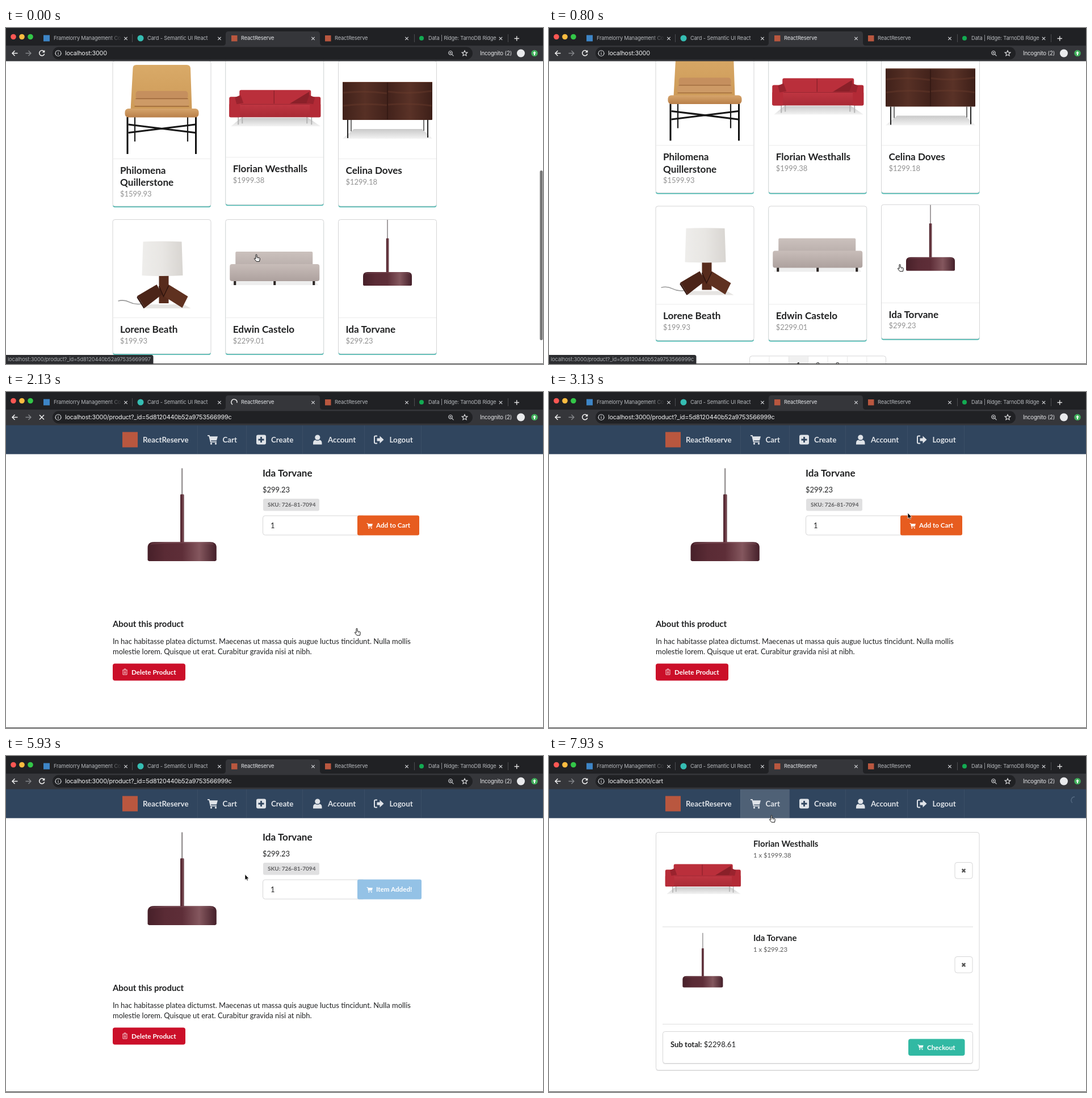
Recreate the animation shown at these times as an HTML page. Size 946 px wide and 592 px high, loop 8000 ms.

```html
<!DOCTYPE html>
<html lang="en">
<head>
<meta charset="utf-8">
<title>Shop demo</title>
<style>
html, body { margin: 0; width: 100%; height: 100%; overflow: hidden; background: #fff; }
svg { display: block; width: 946px; height: 592px; font-family: Lato, sans-serif; }
text { white-space: pre; }
.ui { font-family: Inter, sans-serif; }
</style>
</head>
<body>
<svg id="stage" viewBox="0 0 946 592"></svg>
<script>
const INK = '#212223', NAV = '#30455e', PALE = '#dfe3e8', BAR = '#35363a', DARK = '#202124', BRAND = '#b9573f';

// y is the middle of the capitals
const text = (x, y, s, size = 12.95, weight = 400, fill = INK, more = '') =>
  `<text x="${x}" y="${y + size * .35}" font-size="${size}" font-weight="${weight}" fill="${fill}" ${more}>${s}</text>`;
const ui = (x, y, s, size, fill, more = '') =>
  text(x, y, s, size, 400, fill, `class="ui" letter-spacing="${-size * .018}" ${more}`);
const rect = (x, y, w, h, fill, r = 0, more = '') =>
  `<rect x="${x}" y="${y}" width="${w}" height="${h}" rx="${r}" fill="${fill}" ${more}/>`;
const dot = (x, y, r, fill) => `<circle cx="${x}" cy="${y}" r="${r}" fill="${fill}"/>`;
const line = (d, stroke, w = 1, more = '') => `<path d="${d}" fill="none" stroke="${stroke}" stroke-width="${w}" ${more}/>`;
const fill = (d, color, more = '') => `<path d="${d}" fill="${color}" ${more}/>`;
const group = (id, body, more = '') => `<g id="${id}" ${more}>${body}</g>`;
const put = (id, x, y, scale = 1, more = '') => `<use href="#${id}" transform="translate(${x} ${y}) scale(${scale})" ${more}/>`;
const grad = (id, vertical, ...colors) =>
  `<linearGradient id="${id}" x2="${vertical ? 0 : 1}" y2="${vertical ? 1 : 0}">` +
  colors.map((c, i) => `<stop offset="${i / (colors.length - 1)}" stop-color="${c}"/>`).join('') + '</linearGradient>';
const cross = (x, y, r, color, w) => line(`M${x - r} ${y - r}l${2 * r} ${2 * r}m0 ${-2 * r}l${-2 * r} ${2 * r}`, color, w);
const boxed = (x, y, w, h, r = 4) => rect(x, y, w, h, '#fff', r, 'stroke="#d6d6d7"');

// Product pictures, each in a 174 unit square
const pictures =
  group('chair',
    line('M39.500 100V143M132.500 100V143', '#1b1b1b', 2.2) +
    line('M26.500 100V165M147 100V165', '#111', 3) + line('M28 127.500L146 113M28 113L146 127.500', '#161616', 3) +
    fill('M36 14Q36 8 42 8H131Q137 8 137.500 14L140 87H32Z', 'url(#tan)') +
    rect(41, 54, 92, 14, '#c58f5e', 5) + rect(38, 67, 97, 13, '#cd9a66', 5) +
    line('M41 67.500H133M39 81H135', '#9a6639', 1.3) + rect(22, 85, 130, 15.5, 'url(#seat)', 6)) +
  group('sofa',
    fill('M10 119L28 104H146L168 119Z', 'url(#shadow)') + line('M23 102V116M30 102V114M144 102V114M152 102V116', '#b4b4b4', 2) +
    rect(25, 55, 126, 40, '#ba2f3b', 3) + fill('M112 80L148 58V80Z', '#8a2029') + line('M86 56V80', '#84202a', 1.2) +
    rect(7, 79, 161, 24, 'url(#red)', 2) + rect(7, 67, 19, 36, '#b72d39', 3) + rect(149, 67, 19, 36, '#b32a36', 3) +
    fill('M17 68L27 64L32 78L20 80Z', '#9a232e') + fill('M143 78L148 64L158 68L155 80Z', '#9a232e') + line('M27 80H149', '#96242f')) +
  group('sideboard',
    fill('M8 138L28 121H148L166 138Z', 'url(#shadow)') + line('M17 105V137M158 105V136', '#222', 2) +
    line('M23 105V125M151 105V124', '#444', 1.5) + rect(8, 38, 158, 67, 'url(#wood)', 1) +
    line('M87 39V104', '#2a130f') + line('M9 57Q50 53 86 58M9 80Q45 75 86 79M88 55Q125 60 165 54M88 78Q130 75 165 80', '#71402f', 3, 'opacity=".35"') +
    line('M8 38.500H166', '#6f4233')) +
  group('tablelamp',
    line('M10 144Q20 141 30 146T50 149', '#999', 1.5) + fill('M52 157H138L126 150H60Z', '#e6e4e2') +
    rect(82, 98, 17, 50, '#572b1c') + fill('M44 135L78 115L88 132L57 156Z', '#4b2418') +
    fill('M99 115L133 136L123 156L88 134Z', '#5f3120') + fill('M44 135L57 156L55 157L43 138Z', '#331710') + line('M82 118L90 136L99 117', '#2d130d', 1.5) +
    fill('M54 39.500Q88 38 122 39.500L124 99Q88 101 52 99Z', 'url(#shade)')) +
  group('couch',
    fill('M10 116H164L158 108H16Z', '#eee') + [15, 85, 154].map(x => rect(x, 108, 4, 8, '#2b2523')).join('') +
    rect(18, 57, 136, 34, 'url(#greyback)', 2) + rect(8, 79, 158, 30, 'url(#greyseat)', 4)) +
  group('pendant',
    line('M87 1V34', '#9a9697', 1.8) + rect(84.800, 33.500, 4.600, 61, 'url(#plum)', 1) +
    fill('M44 100Q44 93 52 93H122Q130 93 130 100V115Q130 117 127 117H47Q44 117 44 115Z', 'url(#plum)') +
    line('M48 95.500Q87 92.500 126 95.500', '#87585f', 1, 'opacity=".6"'));

const icons =
  group('basket', fill('M0 0H3.600L4.200 2.200H18L16 9.500H6L6.300 11H16V12.700H4.900L2.300 1.700H0Z', 'currentColor') +
    '<g fill="currentColor"><circle cx="6.500" cy="15" r="1.700"/><circle cx="14.500" cy="15" r="1.700"/></g>') +
  group('hand', fill('M3 1.200Q3 0 4 0T5 1.200V5L9.500 6Q10.600 6.300 10.300 8L9.500 12.300H4.200L.6 8Q0 6.500 1.500 6.700L3 7.800Z',
    '#fff', 'stroke="#111" stroke-linejoin="round" transform="translate(-4 0)"') + line('M2.300 6.500v2M4 6.800v2', '#555', .6)) +
  group('arrow', fill('M0 0V10L2.300 8L3.800 11.200L5.400 10.500L4 7.400H7Z', '#000', 'stroke="#fff" stroke-width=".7"'));

const defs = '<defs>' +
  grad('tan', 1, '#d9aa68', '#cd9a58') + grad('seat', 1, '#d6a56c', '#b97f49') + grad('red', 1, '#c03642', '#a82a35') +
  grad('shadow', 1, '#c9c9c9', '#f3f3f3') +
  grad('wood', 0, '#40211a', '#573025', '#42221b', '#5a3227', '#3d1f18') + grad('shade', 0, '#eeedeb', '#e8e6e3', '#d8d5d1') +
  grad('greyback', 1, '#cbc1bd', '#b4a9a6') + grad('greyseat', 1, '#c8bdb9', '#ada19e') +
  grad('plum', 0, '#472029', '#5a2b35', '#5e2e38', '#84575e', '#45202a') +
  `<linearGradient id="fade"><stop stop-color="${DARK}" stop-opacity="0"/><stop offset="1" stop-color="${DARK}"/></linearGradient>` +
  pictures + icons + '</defs>';

const LAMP = 'Ida Torvane', SOFA = 'Florian Westhalls';
const cards = [
  ['chair', 'Philomena|Quillerstone', '$1599.93'], ['sofa', SOFA, '$1999.38'], ['sideboard', 'Celina Doves', '$1299.18'],
  ['tablelamp', 'Lorene Beath', '$199.93'], ['couch', 'Edwin Castelo', '$2299.01'], ['pendant', LAMP, '$299.23']
];
const card = ([art, name, price], i) => {
  const x = 187.5 + i % 3 * 198.75, y = i < 3 ? 57 : 337, h = i < 3 ? 258 : 238, lines = name.split('|');
  return group('card' + i, rect(x + .5, y + 4, 173, h - 3, '#45b8b0', 4) + rect(x + .5, y + .5, 173, h - 1.5, '#fff', 4, 'stroke="#d4d4d5"') +
    put(art, x, y) + rect(x + 1, y + 173, 172, 1, '#ececec') +
    lines.map((s, n) => text(x + 13.5, y + 194 + n * 21.5, s, 17.14, 700)).join('') +
    text(x + 13.5, y + 214 + (lines.length - 1) * 21.5, price, 12.95, 400, '#929292'));
};
const pager = boxed(353.5, 601.5, 240, 33) + rect(422, 602, 34.3, 32, '#f0f0f0') +
  [1, 2, 3, 4, 5, 6].map(i => rect(353 + i * 34.4, 602, 1, 32, '#e6e6e6')).join('') +
  [...'«‹123›»'].map((s, i) => text(370.5 + i * 34.4, 616.5, s, 11.67, i === 2 ? 700 : 400, INK, 'text-anchor="middle"')).join('');
const home = group('home', cards.map(card).join('') + pager);

const nav = group('nav', rect(0, 58, 946, 51.5, NAV) + rect(337, 58.5, 86.5, 51, '#fff', 0, 'id="cartTab"') +
  [337, 423, 522, 631, 731].map(x => rect(x, 59, 1, 50, '#fff', 0, 'opacity=".05"')).join('') +
  rect(205, 70.5, 27, 27, BRAND) +
  [[241, 'ReactReserve'], [381.5, 'Cart'], [467, 'Create'], [567, 'Account'], [675.5, 'Logout']]
    .map(([x, s]) => text(x, 84.5, s, 13.33, 700, PALE)).join('') +
  put('basket', 355, 76, 1, `color="${PALE}"`) +
  rect(441, 75.5, 17, 17, PALE, 3) + line('M449.500 79v10M444.500 84h10', NAV, 2.8) +
  dot(548.8, 80, 4.6, PALE) + fill('M541 92.500V90Q541 85 545 84.500Q549 87 552.500 84.500Q556.500 85 556.500 90V92.500Z', PALE) +
  line('M654 77.500H651Q649 77.500 649 79.500V88.500Q649 90.500 651 90.500H654', PALE, 2) + fill('M653.500 81.500H658.500V77.500L665.500 84L658.500 90.500V86.500H653.500Z', PALE) +
  line('M926 72A6 6 0 0 0 922 82.500', '#8fa3ba', 1.3, 'id="progress"'));

const product = group('product', put('pendant', 187.5, 133, 1.41) + text(452, 143.5, LAMP, 17.14, 700) + text(452, 172, '$299.23') +
  rect(453, 188, 99, 21.5, '#e0e0e1', 3) + text(461, 198.5, 'SKU: 726-81-7094', 10, 700, '#606062') +
  boxed(452.5, 218, 180, 34) + text(466, 235, '1') +
  rect(619, 217.5, 109, 35, '#e75c1f', 3, 'id="buy"') +
  group('buyLabel', put('basket', 635.5, 231, .58, 'color="#fff"') + text(652, 235, '', 11.67, 700, '#fff')) +
  line('M673 229A6 6 0 0 1 679 235', '#fff', 2, 'id="busy"') +
  text(188, 408.5, 'About this product', 14.95, 700) +
  text(188, 439, 'In hac habitasse platea dictumst. Maecenas ut massa quis augue luctus tincidunt. Nulla mollis') +
  text(188, 457.5, 'molestie lorem. Quisque ut erat. Curabitur gravida nisi at nibh.') +
  rect(188, 478.5, 128, 30, '#cb0f29', 4) + line('M205 490h9M208 489.500v-1.500h3v1.500M206 490.500v7.500h7v-7.500M208.500 492v4.500M210.500 492v4.500', '#fff', .8) +
  text(221, 493.5, 'Delete Product', 11.67, 700, '#fff'));

const row = (art, y, name, detail) => put(art, 199, y, .826) + text(360, y + 9.5, name, 14.95, 700) +
  text(360, y + 30.5, detail, 11.3, 400, '#5a5a5a') + boxed(715, y + 42.5, 31, 28.5) + cross(730.5, y + 57, 2.8, '#555', 2.4);
const cart = group('cart', rect(188.5, 135.5, 569.5, 419.5, '#e6e6e6', 4) + boxed(188.5, 134.5, 569.5, 419) +
  row('sofa', 145, SOFA, '1 x $1999.38') + row('pendant', 311, LAMP, '1 x $299.23') +
  rect(200, 300.5, 547, 1, '#dedede') + rect(200, 472, 547, 1, '#dedede') +
  rect(200.5, 487, 546, 56, '#e6e6e6', 4) + boxed(200.5, 485.5, 546, 56) + text(214, 508.5, '<tspan font-weight="700">Sub total:</tspan> $2298.61', 13.1) +
  rect(633, 498.5, 99.5, 29.5, '#31b9a3', 4) + put('basket', 649.5, 508.5, .56, 'color="#fff"') + text(666, 513.5, 'Checkout', 11.67, 700, '#fff'));

const tabs = [
  ['Framelorry Management Co', rect(66, 12.5, 11, 11, '#3d85c6')], ['Card - Semantic UI React', dot(237, 18, 5.5, '#35bdb2')],
  ['ReactReserve', rect(397, 13, 10.5, 10.5, BRAND, 0, 'id="favicon"')], ['ReactReserve', rect(562, 13, 10.5, 10.5, BRAND)],
  ['Data | Ridge: TarnoDB Ridge', dot(732, 18, 4, '#13aa52')]
];
const browser = rect(0, 0, 946, 31, DARK) + rect(0, 31, 946, 27.5, BAR) + fill('M382 31Q387 31 387 26V11Q387 6 392 6H548Q553 6 553 11V26Q553 31 558 31Z', BAR) +
  rect(82, 33.5, 740, 22, DARK, 11) + dot(13, 15.5, 4.8, '#fc5753') + dot(28, 15.5, 4.8, '#fdbc40') + dot(43, 15.5, 4.8, '#33c748') +
  tabs.map(([s, mark], i) => mark + ui([84, 249, 414, 579, 744][i], 18, s, 9.25, i === 2 ? '#e4e6e9' : '#b6b9bd') +
    (i ? '' : rect(180, 10, 24, 16, 'url(#fade)')) + cross([211, 376, 541, 706, 871.5][i], 18.5, 2.7, '#d0d2d5', 1.2)).join('') +
  [222, 719, 884].map(x => rect(x, 11, 1, 14, '#4c4d51')).join('') + line('M895.500 18.500h8.500M899.750 14.250v8.500', '#e0e0e0', 1.4) +
  line('M402 13A5 5 0 1 1 397.500 20', '#e8e8e8', 1.5, 'id="tabSpin"') +
  line('M20.500 44.500H11.500M15.500 40L11 44.500L15.500 49', '#f1f1f1', 1.5) + line('M34.500 44.500H43.500M39.500 40L44 44.500L39.500 49', '#85878b', 1.4) +
  group('reload', line('M67 41.500A4.600 4.600 0 1 0 67.700 45.500', '#f1f1f1', 1.5) + fill('M68.300 38.700V43.300H63.700Z', '#f1f1f1')) +
  group('stop', cross(63, 44.5, 4, '#f1f1f1', 1.5)) +
  line('M92 39.500a5 5 0 1 0 .01 0M92 43.700v3.500M92 41.500v1.200', '#cfd1d4', 1.1) + ui(104, 44.5, '', 10.83, '#f0f1f2', 'id="url"') +
  line('M783 40.500a3.300 3.300 0 1 0 .01 0M785.500 46.300L788.500 49.300M781.500 43.800h3M783 42.300v3', '#d5d7da', 1.1) +
  line('M808 39.700l1.400 3.200 3.500.3-2.700 2.300.8 3.400-3-1.800-3 1.800.8-3.400-2.700-2.300 3.500-.3z', '#e0e1e3', 1.1) +
  ui(835, 44.5, 'Incognito (2)', 9.7, '#e6e7e9') + dot(907, 44.5, 7, '#e9eaec') + dot(931, 44.5, 5.8, '#3fae5a') + fill('M931 41L934 44.500H932V48H930V44.500H928Z', '#fff');

const status = group('status', fill('M0 576H256Q259.500 576 259.500 579.500V592H0Z', '#2c2d30') + ui(3, 584, '', 9.3, '#a9acb0'));

const stage = document.getElementById('stage');
stage.innerHTML = defs + rect(0, 0, 946, 592, '#fff') + home + product + cart + nav +
  rect(940.5, 251, 5, 299, '#777', 2.5, 'id="thumb"') + browser + rect(0, 591, 946, 1, '#4a4a4a') + status +
  group('pointer', put('hand', 0, 0, 1, 'id="pointHand"') + put('arrow', 0, 0, 1, 'id="pointArrow"'));

const $ = id => document.getElementById(id);
const set = (id, values) => { for (const k in values) $(id).setAttribute(k, values[k]); };
const show = (id, on) => set(id, { display: on ? 'inline' : 'none' });
const label = (el, s) => { if (el.textContent !== s) el.textContent = s; };
const ramp = (t, a, b) => { const k = Math.min(1, Math.max(0, (t - a) / (b - a))); return k * k * (3 - 2 * k); };

// Pointer stops: start, end, x, y
const stops = [[0, 100, 441, 399], [650, 2470, 618, 416.5], [3100, 3670, 632, 213], [3800, 5420, 638, 246], [5850, 6300, 421, 208.5], [6980, 8000, 392, 104.5]];
const pointerAt = t => {
  let [, , x, y] = stops[0];
  for (let i = 1; i < stops.length; i++) {
    const k = ramp(t, stops[i - 1][1], stops[i][0]);
    x += (stops[i][2] - x) * k;
    y += (stops[i][3] - y) * k;
  }
  return [x, y];
};

const PRODUCT = 'localhost:3000/product?_id=5d8120440b52a9753566999';

function draw(t) {
  const isHome = t < 1270, isCart = t >= 7600, [x, y] = pointerAt(t), loading = t >= 1270 && t < 2150;
  show('home', isHome);
  show('product', !isHome && !isCart);
  show('cart', isCart);
  show('nav', !isHome);

  const scroll = 23.6 * ramp(t, 70, 420);
  set('home', { transform: `translate(0 ${-scroll})` });
  const lifts = { 1: 1 - ramp(t, 20, 160), 4: ramp(t, 70, 180) - ramp(t, 400, 500), 5: ramp(t, 430, 560) };
  for (const i in lifts) set('card' + i, { transform: `translate(0 ${-2.7 * lifts[i]})` });
  set('thumb', { y: 251 + scroll * .56, opacity: isHome ? 1 - ramp(t, 450, 750) : 0 });

  show('status', t < 1740);
  label($('status').lastChild, PRODUCT + (x > 573 ? 'c' : '7'));
  label($('url'), isHome ? 'localhost:3000' : isCart ? 'localhost:3000/cart' : PRODUCT + 'c');
  show('reload', !loading);
  show('stop', loading);
  show('favicon', !loading);
  show('tabSpin', loading);
  set('tabSpin', { transform: `rotate(${(t - 1530) * .36} 402 18)` });

  const busy = t >= 3850 && t < 3980, added = t >= 3980 && t < 6850;
  set('buy', { fill: added ? '#94c2e6' : '#e75c1f', width: added ? 113 : 109 });
  show('buyLabel', !busy);
  show('busy', busy);
  set('busy', { transform: `rotate(${t * .6} 673 235)` });
  label($('buyLabel').lastChild, added ? 'Item Added!' : 'Add to Cart');

  const overCart = t > 6300 && y < 109;
  set('cartTab', { opacity: isCart ? .15 : overCart ? .045 : 0 });
  set('progress', { opacity: .8 * ramp(t, 7250, 7400) * (1 - .5 * ramp(t, 7700, 7930)), transform: `rotate(${(t - 7930) * .9} 926 78)` });

  const overBuy = t > 2470 && x > 619 && x < 728 && y > 217 && y < 252 && !added;
  const hand = t < 2470 || overBuy || overCart;
  show('pointHand', hand);
  show('pointArrow', !hand);
  set('pointer', { transform: `translate(${x} ${y})` });
}

const start = performance.now();
(function tick() {
  draw((performance.now() - start) % 8000);
  requestAnimationFrame(tick);
})();
</script>
</body>
</html>
```
